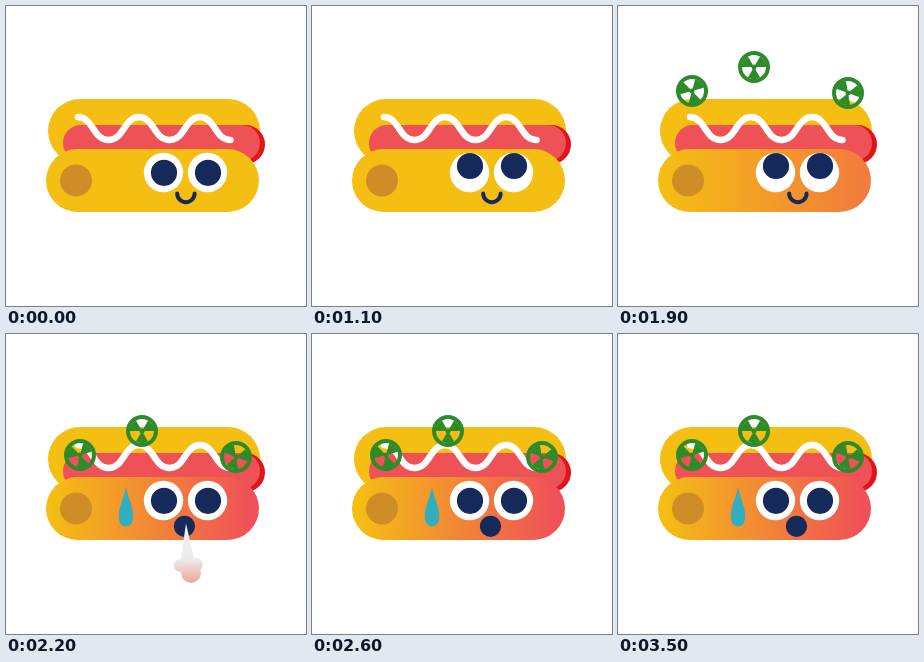
Write an HTML page that moves like this. It is 300 px wide and 300 px high and loops after 4000 ms.

```html
<!DOCTYPE html>
<html lang="en">
<head>
<meta charset="utf-8">
<title>Hot dog</title>
<style>
html, body { margin: 0; width: 100%; height: 100%; overflow: hidden; background: #fff; }
svg { display: block; width: 100%; height: 100%; }
</style>
</head>
<body>
<svg viewBox="0 0 300 300" xmlns="http://www.w3.org/2000/svg">
  <defs>
    <linearGradient id="heat" gradientUnits="userSpaceOnUse" x1="45" y1="0" x2="245" y2="0">
      <stop offset="0" stop-color="#f5be13"/>
      <stop id="hot" offset="1" stop-color="#f5be13"/>
    </linearGradient>
    <linearGradient id="breath" gradientUnits="userSpaceOnUse" x1="0" y1="190" x2="0" y2="249">
      <stop offset="0" stop-color="#f1f1f1"/>
      <stop offset=".6" stop-color="#ecebea"/>
      <stop offset="1" stop-color="#efa497"/>
    </linearGradient>
  </defs>

  <rect x="42" y="93" width="212" height="64" rx="32" fill="#f5be13"/>
  <rect x="190" y="119" width="69" height="39" rx="19.5" fill="#e0151c"/>
  <rect x="57" y="119" width="197" height="36" rx="18" fill="#ee5257"/>
  <path d="M72 111C87 111 87 134 102.500 134S118 111 133 111S148 134 163.500 134S179 111 194 111S209 134 224.500 134"
    fill="none" stroke="#fff" stroke-width="6.500" stroke-linecap="round"/>
  <rect x="40" y="143" width="213" height="63" rx="31.500" fill="url(#heat)"/>
  <circle cx="70" cy="174.500" r="16" fill="#cf8d28"/>

  <g id="peppers" fill="#2e8b2a"></g>

  <path id="tear" d="M120 153C122 164 127.300 173 127.300 182C127.300 189 124 192.500 120 192.500S112.700 189 112.700 182C112.700 173 118 164 120 153Z" fill="#33adc0"/>

  <g id="open">
    <circle cx="157.500" cy="166.500" r="19.700" fill="#fff"/>
    <circle cx="201.500" cy="166.500" r="19.700" fill="#fff"/>
    <g id="pupils" fill="#152a5b">
      <circle cx="158" cy="166.800" r="13.100"/>
      <circle cx="202" cy="166.800" r="13.100"/>
    </g>
  </g>
  <path id="closed" d="M140.500 166.500H174.500M184.500 166.500H218.500" stroke="#152a5b" stroke-width="5" stroke-linecap="round"/>

  <path id="smile" d="M171.200 187.500a8.700 8.700 0 0 0 17.400 0" fill="none" stroke="#152a5b" stroke-width="4" stroke-linecap="round"/>
  <circle id="mouth" cx="178.500" cy="192.300" r="10.600" fill="#152a5b"/>

  <g id="steam" fill="url(#breath)">
    <path d="M180 189.500L189.500 231H174Z"/>
    <circle cx="185" cy="239" r="10"/>
    <circle cx="174" cy="231.500" r="6.200"/>
    <circle cx="182" cy="233" r="7"/>
    <circle cx="190.500" cy="230.500" r="6.500"/>
  </g>
</svg>
<script>
const LOOP = 4000, STEP = 100;
const el = id => document.getElementById(id);
const show = (id, on) => el(id).setAttribute('display', on ? 'inline' : 'none');
const mix = (a, b, p) => `rgb(${a.map((v, i) => Math.round(v + (b[i] - v) * p))})`;
const blinks = [500, 3100, 3400];

// A ring with three solid blades; the gaps between them are see-through.
function pepper(x, y, turn) {
  const r = 12.2;
  const at = deg => {
    const a = (deg + turn) * Math.PI / 180;
    return `${(r * Math.cos(a)).toFixed(2)} ${(r * Math.sin(a)).toFixed(2)}`;
  };
  const blades = [-30, 90, 210]
    .map(d => `M0 0L${at(d - 30)}A${r} ${r} 0 0 1 ${at(d + 30)}Z`).join('');
  return `<g transform="translate(${x} ${y})">
    <circle r="14" fill="none" stroke="#2e8b2a" stroke-width="4"/>
    <circle r="2.500"/><path d="${blades}"/></g>`;
}

el('peppers').innerHTML =
  pepper(74, 121, -15) + pepper(136, 97, 0) + pepper(230, 123, 20);

function draw(ms) {
  const t = Math.floor(ms % LOOP / STEP) * STEP;
  const p = Math.max(0, Math.min(1, (t - 1600) / 500));
  const spicy = t >= 2200;
  const shut = blinks.includes(t);

  el('hot').setAttribute('stop-color', mix([245, 190, 19], [240, 80, 88], p));
  show('peppers', t >= 1600);
  el('peppers').setAttribute('transform', `translate(0 ${-90 * (1 - p)})`);

  show('open', !shut);
  show('closed', shut);
  el('pupils').setAttribute('transform', `translate(0 ${t >= 1100 && !spicy ? -6.8 : 0})`);

  show('tear', spicy);
  show('mouth', spicy);
  show('smile', !spicy);

  // The breath grows out of the mouth, then vanishes.
  show('steam', spicy && t < 2600);
  const s = 1 + 0.215 * (t - 2200) / STEP;
  el('steam').setAttribute('transform', `translate(180 189.500) scale(${s}) translate(-180 -189.500)`);
}

const start = performance.now();
function tick() {
  draw(performance.now() - start);
  requestAnimationFrame(tick);
}
tick();
</script>
</body>
</html>
```
